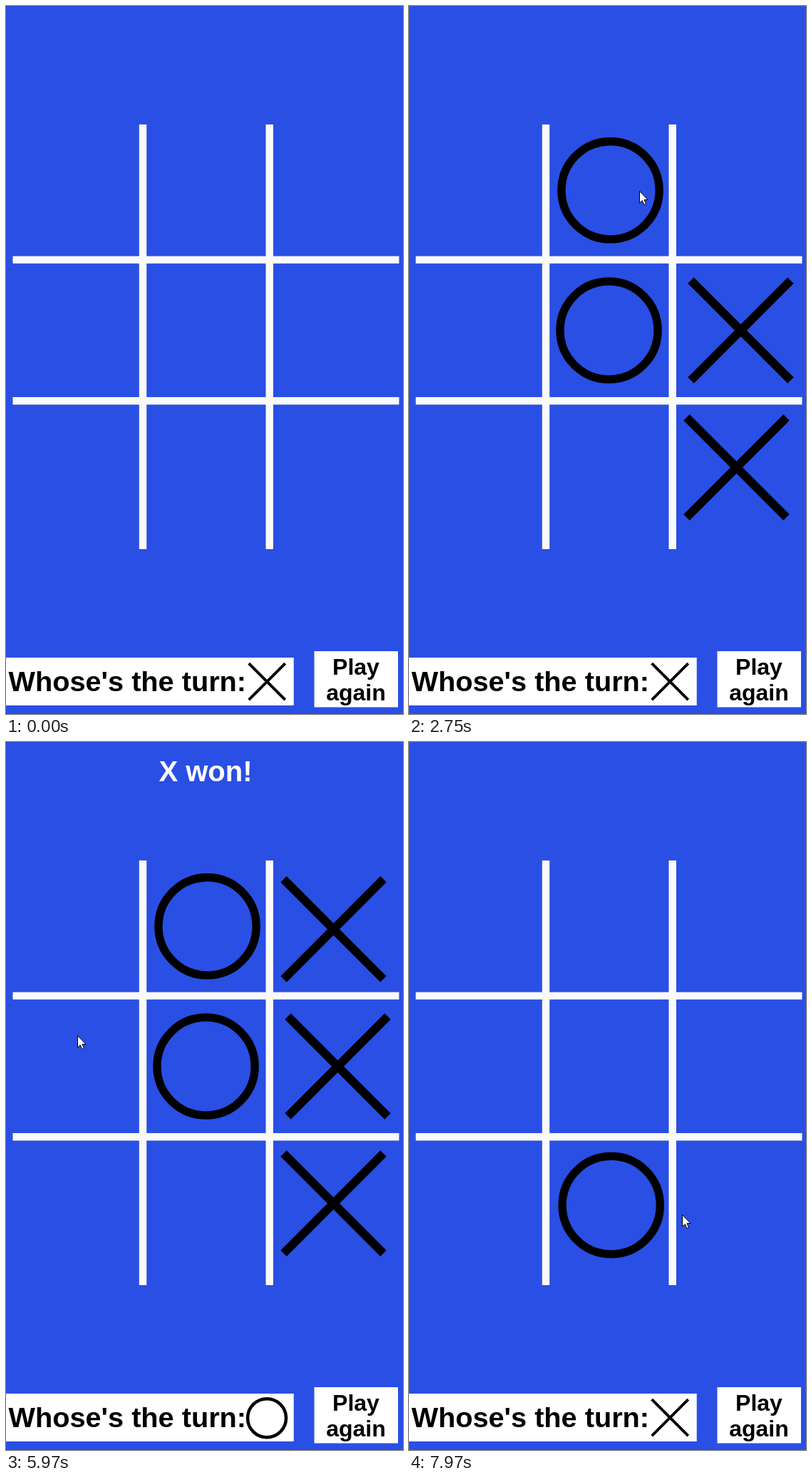
These frames come from a looping animation (557 px wide and 992 px high, 8 s). An HTML page:

```html
<!DOCTYPE html>
<html lang="en">
<head>
<meta charset="utf-8">
<title>Tic-tac-toe</title>
<style>
  html, body { margin: 0; height: 100%; overflow: hidden; background: #2a4fe5; }
  svg { display: block; width: 100vw; height: 100vh; }
  text { font-family: "Liberation Sans", Arial, sans-serif; font-weight: bold; }
  .grid { stroke: #fafafa; stroke-width: 10.4; }
  .mark { fill: none; stroke: #000; }
</style>
</head>
<body>
<svg viewBox="0 0 557 992">
  <rect width="557" height="992" fill="#2a4fe5"/>
  <path class="grid" d="M192 166V761M369.7 166V761M9.5 355.6H551.5M9.5 553.3H551.5"/>
  <g id="board"></g>
  <text id="won" x="280" y="55" font-size="40" text-anchor="middle" fill="#fff">X won!</text>

  <rect y="913" width="403.7" height="67" fill="#fff"/>
  <text x="3.5" y="960" font-size="39.7">Whose's the turn:</text>
  <path id="turnX" class="mark" stroke-width="4" d="M340.7 921.2l51 51m0-51l-51 51"/>
  <circle id="turnO" class="mark" stroke-width="4.5" cx="366" cy="947.3" r="27"/>

  <rect id="button" x="432.5" y="904" width="117.5" height="78.5"/>
  <g font-size="32" text-anchor="middle">
    <text x="491" y="936.5">Play</text>
    <text x="491" y="972.5">again</text>
  </g>
  <path id="cursor" fill="#fff" stroke="#000" d="M.5 .5V17L4.3 13.5L7 19.5L9.5 18.4L7 12.5H12Z"/>
</svg>
<script>
const LOOP = 8000, STEP = 76.7, WIN = 3050, RESET = 7000;
const byId = id => document.getElementById(id);

// X and O alternate, X begins.
const moves = [
  { time: 450, x: 465.5, y: 454.5 },
  { time: 1250, x: 280.5, y: 454.5 },
  { time: 1830, x: 459.5, y: 646.5 },
  { time: 2660, x: 282.5, y: 258.3 },
  { time: WIN, x: 459.5, y: 262.3 },
  { time: 7800, x: 283.7, y: 649 }
];

// The pointer visits each move and wanders through these points in between.
const pointerStops = [
  ...moves,
  { time: 1905, x: 407, y: 603 },
  { time: 3360, x: 354, y: 369 },
  { time: 3592, x: 256, y: 551 },
  { time: 4200, x: 220, y: 710 },
  { time: 4743, x: 441, y: 922 },
  { time: 5050, x: 312, y: 741 },
  { time: 5750, x: 88, y: 366 },
  { time: 5971, x: 100, y: 411 },
  { time: 6720, x: 518, y: 963 },
  { time: 6891, x: 508, y: 947 },
  { time: 7590, x: 455, y: 890 },
  { time: 7965, x: 383, y: 662 }
].sort((a, b) => a.time - b.time);

function pointerAt(time) {
  const next = pointerStops.findIndex(stop => stop.time > time);
  if (next === 0) return pointerStops[0];
  if (next < 0) return pointerStops[pointerStops.length - 1];
  const from = pointerStops[next - 1], to = pointerStops[next];
  const part = (time - from.time) / (to.time - from.time);
  return { x: from.x + (to.x - from.x) * part, y: from.y + (to.y - from.y) * part };
}

// Rises from 0 to 1 after start and falls back after end, 100 ms each way.
function fade(time, start, end) {
  const ramp = since => Math.min(1, Math.max(0, (time - since) / 100));
  return ramp(start) - ramp(end);
}

function buttonShade(time) {
  const hover = fade(time, 4670, 4890) + fade(time, 6690, 7600);
  const press = fade(time, 6850, RESET);
  return Math.round(255 - 10 * hover - 45 * press);
}

function show(element, visible) {
  element.style.display = visible ? "" : "none";
}

moves.forEach((move, index) => {
  const isX = index % 2 === 0;
  const shape = document.createElementNS("http://www.w3.org/2000/svg", isX ? "path" : "circle");
  if (isX) shape.setAttribute("d", "M-70 -70L70 70M70 -70L-70 70");
  else shape.setAttribute("r", 68.6);
  shape.setAttribute("class", "mark");
  shape.setAttribute("stroke-width", isX ? 12 : 11.4);
  shape.setAttribute("transform", `translate(${move.x} ${move.y})`);
  byId("board").append(shape);
  move.shape = shape;
});

function draw(now) {
  // The picture advances in steps of about 13 per second.
  const time = Math.max(0, Math.floor((now % LOOP + 21) / STEP) * STEP - 12);
  const played = moves.filter(move => time >= move.time);
  for (const move of moves) {
    show(move.shape, played.includes(move) && (time < RESET || move.time > RESET));
  }
  show(byId("turnX"), played.length % 2 === 0);
  show(byId("turnO"), played.length % 2 === 1);
  show(byId("won"), time >= WIN && time < RESET);

  const shade = buttonShade(time);
  byId("button").setAttribute("fill", `rgb(${shade},${shade},${shade})`);

  const { x, y } = pointerAt(time);
  show(byId("cursor"), time > 0);
  byId("cursor").setAttribute("transform", `translate(${Math.round(x)} ${Math.round(y)})`);
}

const start = performance.now();
function tick() {
  draw(performance.now() - start);
  requestAnimationFrame(tick);
}
tick();
</script>
</body>
</html>
```
